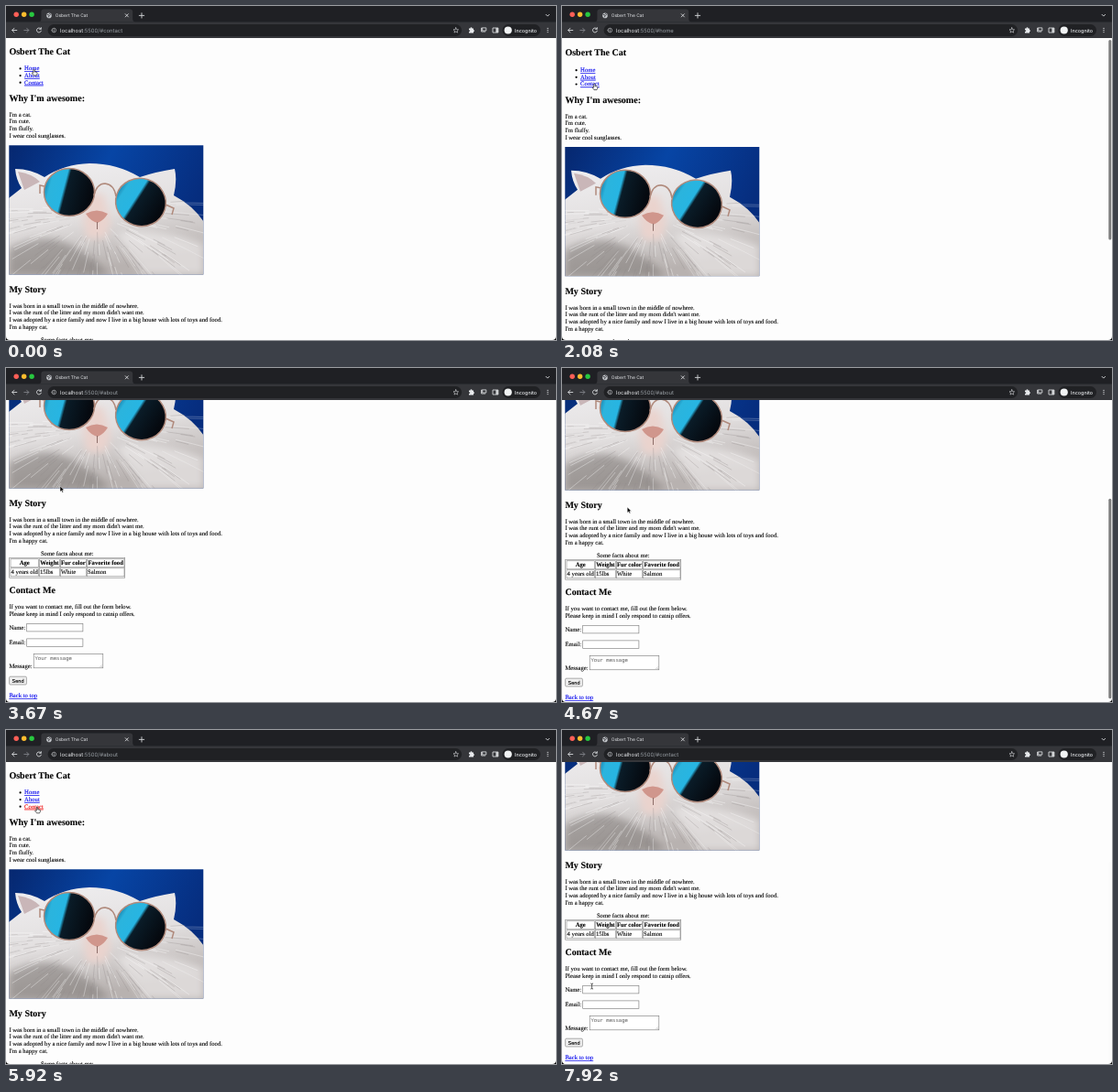
An HTML page for the animation above (8 s loop, 600 px wide and 365 px high).

```html
<!DOCTYPE html>
<html lang="en">
<head>
<meta charset="utf-8">
<title>Page anchors</title>
<style>
html, body { margin: 0; width: 100%; height: 100%; overflow: hidden; background: #000; }
svg { display: block; width: 100vw; height: 100vh; }
text { white-space: pre; text-rendering: geometricPrecision; }
.serif { font: 6.68px "Liberation Serif", Times, serif; color: #000; }
.serif text { fill: currentColor; stroke: currentColor; stroke-width: .1; }
.serif .head { font-size: 10.05px; font-weight: bold; }
.serif .bold { font-weight: bold; }
.serif .link { color: #00e; text-decoration: underline; }
.serif .hint { font: 5.64px "Liberation Mono", monospace; color: #757575; }
.serif .button { font: 5.64px "Liberation Sans", sans-serif; }
.mid { text-anchor: middle; }
.ui { font-family: Inter, Roboto, sans-serif; fill: #e8eaed; }
.icon { fill: none; stroke: #d5d7da; stroke-width: .9; stroke-linecap: round; stroke-linejoin: round; }
</style>
</head>
<body>
<svg id="stage" viewBox="0 0 600 365">
  <defs>
    <linearGradient id="sky" x2="1" y2=".3">
      <stop stop-color="#06276f"/><stop offset=".5" stop-color="#0745a5"/><stop offset="1" stop-color="#062d7e"/>
    </linearGradient>
    <linearGradient id="fur" x2=".3" y2="1">
      <stop stop-color="#f0eff1"/><stop offset=".55" stop-color="#e2dfdf"/><stop offset="1" stop-color="#b8b2b0"/>
    </linearGradient>
    <linearGradient id="lens" x2="1" y2=".25">
      <stop stop-color="#0c5f8c"/><stop offset=".2" stop-color="#2bb4dd"/><stop offset=".46" stop-color="#27b5e2"/>
      <stop offset=".52" stop-color="#0a1c28"/><stop offset="1" stop-color="#05090f"/>
    </linearGradient>
    <filter id="soft" x="-50%" y="-50%" width="200%" height="200%"><feGaussianBlur stdDeviation="4"/></filter>
    <clipPath id="window"><path d="M0 0H600V361q0 4-4 4H4q-4 0-4-4z"/></clipPath>
    <clipPath id="photo"><rect x="3.3" y="152.2" width="212" height="141.3"/></clipPath>
  </defs>
  <g clip-path="url(#window)">
    <rect width="600" height="365" fill="#fdfdfd"/>
    <g id="page" class="serif"></g>
    <rect id="bar" x="596.3" width="3" height="218.5" rx="1.5" fill="#7d7d7d"/>
    <g id="chrome"></g>
  </g>
  <g id="pointer" stroke-linejoin="round">
    <path id="arrow" d="M0 0V6.2L1.5 4.9 2.5 7.1 3.5 6.7 2.6 4.5H4.5Z" fill="#000" stroke="#fff" stroke-width=".5"/>
    <path id="hand" d="M-.7 .1Q0-.6 .7 .1V2.5Q3.4 2.2 3.5 3.6 3.5 5 2.6 6.4H-.5Q-1.4 5-2.4 3.8-2.3 2.9-.7 3.8Z" fill="#fff" stroke="#000" stroke-width=".6"/>
    <path id="beam" d="M-1.4-3Q0-3 0-2.2 0-3 1.4-3M0-2.2V2.2M-1.4 3Q0 3 0 2.2 0 3 1.4 3" fill="none" stroke="#222" stroke-width=".7"/>
  </g>
</svg>
<script>
const LOOP = 8000, LINE = 7.65, LEFT = 3.4, TOP = 35, MAX = 162;
const $ = id => document.getElementById(id);
const text = (x, y, str, cls = '', more = '') => `<text x="${x}" y="${y}" class="${cls}" ${more}>${str}</text>`;
const rect = (x, y, w, h, more) => `<rect x="${x}" y="${y}" width="${w}" height="${h}" ${more}/>`;
const path = (d, more) => `<path d="${d}" ${more}/>`;
const dot = (x, y, r, fill) => `<circle cx="${x}" cy="${y}" r="${r}" fill="${fill}"/>`;
const icon = (d, more = '') => path(d, 'class="icon" ' + more);
const box = (x, y, w, h, color = '#767676') => rect(x, y, w, h, `fill="#fff" stroke="${color}" stroke-width=".6"`);
const section = (y, title, rows) => text(LEFT, y, title, 'head') +
  rows.map((s, i) => text(LEFT, y + 17 + i * LINE, s)).join('');
const field = (y, label) => text(LEFT, y, label) + box(22.7, y - 6.5, 61.2, 8.6);

let seed = 7;
const random = () => (seed = seed * 16807 % 2147483647) / 2147483647;

// Hairs fan out from the nose
function hairs(count, color, width, reach) {
  let d = '';
  for (let i = 0; i < count; i++) {
    const a = (random() * 1.25 - .12) * Math.PI, near = 22 + random() * 70, far = near + reach * (.5 + random());
    const at = r => `${(99 + r * Math.cos(a)).toFixed(1)} ${(230 + r * .75 * Math.sin(a) + r * r / 900).toFixed(1)}`;
    d += `M${at(near)}Q${at((near + far) / 2 + 3)} ${at(far)}`;
  }
  return path(d, `fill="none" stroke="${color}" stroke-width="${width}" opacity=".5"`);
}

function photo() {
  const lens = (x, y, turn) => `<ellipse cx="${x}" cy="${y}" rx="27.5" ry="26"
    transform="rotate(${turn} ${x} ${y})" fill="url(#lens)" stroke="#b08a7c" stroke-width="1.5"/>`;
  return `<g clip-path="url(#photo)">` + rect(3, 152, 213, 142, 'fill="url(#sky)"') +
    path('M3 210L17 199Q11 190 10 178 27 178 42 187 63 173 91 172 121 172 146 187 164 181 184 178 187 190 183 207 204 218 216 236V294H3Z', 'fill="url(#fur)"') +
    path('M13 181Q28 183 37 192L20 201Z', 'fill="#c9b6b8"') +
    `<g filter="url(#soft)">` +
    path('M3 266Q40 244 74 263 98 275 112 294H3Z', 'fill="#77706f" opacity=".5"') +
    path('M120 248Q165 242 216 260V294H150Z', 'fill="#f4f2f2" opacity=".6"') +
    path('M92 205H106L114 236 108 254H88L84 232Z', 'fill="#ead3cd"') + '</g>' +
    hairs(70, '#8d8785', .6, 22) + hairs(70, '#fff', .7, 26) + hairs(12, '#fff', .5, 90) +
    path('M87 227Q99 220 111 227 107 234 100 237 92 235 87 227Z', 'fill="#d0968c"') +
    path('M99.5 236V244', 'stroke="#8d6d68"') +
    lens(69, 203.5, 0) + lens(147, 214.5, 18) +
    path('M96 207Q99 194 108 194 118 195 120 208M42 197L37 196V205M174 217L183 221 181 228', 'fill="none" stroke="#b08a7c" stroke-width="1.5"') +
    '</g>';
}

function table() {
  let x = 5;
  const column = ([head, value, w]) => {
    const cell = box(x, 370.8, w, 9, '#808080') + box(x, 380.8, w, 9, '#808080') +
      text(x + w / 2, 377.3, head, 'bold mid') + text(x + .6, 387.3, value);
    x += w + .9;
    return cell;
  };
  return text(66.7, 367.1, 'Some facts about me:', 'mid') + box(3.7, 369.5, 126, 21.7, '#808080') +
    [['Age', '4 years old', 30.5], ['Weight', '15lbs', 22], ['Fur color', 'White', 28.2],
      ['Favorite food', 'Salmon', 40.6]].map(column).join('');
}

$('page').innerHTML =
  text(LEFT, 52.5, 'Osbert The Cat', 'head') +
  ['Home', 'About', 'Contact'].map((s, i) => dot(15.6, 68.4 + i * LINE, 1.1, '#000') +
    text(20.1, 70.3 + i * LINE, s, 'link', `id="${s}"`)).join('') +
  section(103.8, "Why I'm awesome:", ["I'm a cat.", "I'm cute.", "I'm fluffy.", 'I wear cool sunglasses.']) +
  photo() +
  section(312.8, 'My Story', ['I was born in a small town in the middle of nowhere.',
    "I was the runt of the litter and my mom didn't want me.",
    'I was adopted by a nice family and now I live in a big house with lots of toys and food.',
    "I'm a happy cat."]) +
  table() +
  section(408.4, 'Contact Me', ['If you want to contact me, fill out the form below.',
    'Please keep in mind I only respond to catnip offers.']) +
  field(447.8, 'Name:') + field(464.4, 'Email:') +
  text(LEFT, 490.2, 'Message:') + box(30.2, 474.6, 75.6, 15.2) + text(31.4, 481, 'Your message', 'hint') +
  path('M102.3 489L105 486.3M104 489L105 488', 'stroke="#888" stroke-width=".4"') +
  rect(3.6, 499.2, 18.8, 8.8, 'rx="1.2" fill="#efefef" stroke="#767676" stroke-width=".6"') +
  text(13, 505.7, 'Send', 'button mid') +
  text(LEFT, 522.1, 'Back to top', 'link');

$('chrome').innerHTML =
  rect(0, 0, 600, 18, 'fill="#1f2024"') +
  rect(0, 17.5, 600, TOP - 17.5, 'fill="#35363a"') +
  path('M35 17.6Q38.4 17.6 38.4 14V6.5Q38.4 3.4 41.5 3.4H135Q138.2 3.4 138.2 6.5V14Q138.2 17.6 141.6 17.6Z', 'fill="#35363a"') +
  ['#ff5f57', '#febc2e', '#28c840'].map((c, i) => dot(11.2 + i * 8.45, 9.3, 2.7, c)).join('') +
  dot(47, 10.4, 2.8, '#c2c5c9') + icon('M45 9.4L47.4 10.2 46.4 12M47.5 8.4L49 9.6', 'style="stroke:#35363a"') +
  text(53.8, 12.2, 'Osbert The Cat', 'ui', 'font-size="4.9"') +
  icon('M130.2 8.7L133.4 11.9M133.4 8.7L130.2 11.9M145.3 10.4H150.7M148 7.7V13.1M589 9.3L590.8 11.1 592.6 9.3') +
  icon('M11.8 26.5H6.8M9 24.2L6.7 26.5 9 28.8') +
  icon('M19.8 26.5H24.8M22.6 24.2L24.9 26.5 22.6 28.8', 'style="stroke:#808388"') +
  icon('M38 24.9A2.5 2.5 0 1 0 38.4 27.2M38.3 23.6V25.3H36.6') +
  rect(45.6, 20.1, 451.5, 12.8, 'rx="6.4" fill="#202124"') +
  icon('M50 26.5a2.3 2.3 0 1 0 4.6 0a2.3 2.3 0 1 0-4.6 0M52.3 26.4V27.7M52.3 25.2V25.3', 'style="stroke-width:.6"') +
  `<text x="59" y="28.6" class="ui" font-size="5.9">localhost<tspan fill="#9aa0a6">:5500/#</tspan><tspan id="hash" fill="#9aa0a6"></tspan></text>` +
  icon('M490.8 23.7L491.6 25.6 493.6 25.8 492.1 27.1 492.6 29.1 490.8 28 489 29.1 489.5 27.1 488 25.8 490 25.6Z', 'style="stroke-width:.6"') +
  path('M505 24.6H506.6Q506.4 23.3 507.5 23.3 508.6 23.3 508.4 24.6H510V26.3Q511 26.2 511 27.1 511 28 510 27.9V29.4H505V27.9Q506.3 27.9 506.3 27 506.3 26.2 505 26.2Z', 'fill="#e8eaed"') +
  icon('M519.2 24H518.6V28H522.7M520 23.9H523.8V27H520Z') +
  icon('M531.4 24H536.9V29H531.4Z') + rect(534.4, 24, 2.5, 5, 'fill="#d5d7da"') +
  rect(541.5, 20.1, 41.5, 12.8, 'rx="6.4" fill="#202124"') +
  dot(547.7, 26.5, 4.1, '#f1f3f4') +
  text(555, 28.5, 'Incognito', 'ui', 'font-size="5.4" font-weight="500"') +
  [-1, 0, 1].map(i => dot(591, 26.5 + i * 2.1, .65, '#d5d7da')).join('');

const clamp = u => Math.min(Math.max(u, 0), 1);
const smooth = u => (u = clamp(u), u * u * (3 - 2 * u));

// Each click jumps to an anchor; the wheel later brings the page back to the top
const PRESS = 140, BOUNCE = 250;
const visits = [
  { link: 'Home', click: 420, to: 59, back: 1635, end: 1955 },
  { link: 'About', click: 2850, to: MAX, back: 4620, end: 5400 },
  { link: 'Contact', click: 6000, to: MAX, back: LOOP, end: LOOP + 1 },
];
// Pointer stops: leave and arrive times, place
const stops = [
  { x: 30.6, y: 69.5 },
  { from: 420, till: 1080, x: 41, y: 28.5 },
  { from: 1300, till: 1900, x: 35.4, y: 85.2 },
  { from: 2150, till: 2580, x: 31, y: 76.5 },
  { from: 3100, till: 4000, x: 71.2, y: 152 },
  { from: 4900, till: 5700, x: 34, y: 84.4 },
  { from: 6300, till: 7300, x: 32.6, y: 280 },
];

function scrollAt(t, v) {
  if (!v) return 0;
  const bounce = Math.sin(Math.PI * clamp((t - v.end) / BOUNCE));
  return v.to * (1 - smooth((t - v.back) / (v.end - v.back))) - 1.8 * bounce;
}

function pointerAt(t) {
  let { x, y } = stops[0];
  for (const s of stops.slice(1)) {
    const u = smooth((t - s.from) / (s.till - s.from));
    x += (s.x - x) * u;
    y += (s.y - y) * u;
  }
  return [x, y];
}

function shapeAt(x, y, scroll) {
  const over = (x0, x1, y0, y1) => y > TOP && x > x0 && x < x1 && y + scroll > y0 && y + scroll < y1;
  return over(20, 42, 64, 88) ? 'hand' : over(22, 84, 441, 450) ? 'beam' : 'arrow';
}

function draw(t) {
  const visit = visits.filter(v => v.click <= t).pop();
  const pressed = visits.find(v => t >= v.click - PRESS && t < v.click);
  const scroll = scrollAt(t, visit), [x, y] = pointerAt(t);

  $('page').setAttribute('transform', `translate(0 ${-scroll})`);
  $('hash').textContent = visit ? visit.link.toLowerCase() : 'contact';
  for (const { link } of visits) $(link).style.color = pressed && pressed.link === link ? '#e00' : '';

  $('bar').setAttribute('y', 37 + clamp(scroll / MAX) * 107);
  $('bar').setAttribute('opacity', visit ? clamp((t - visit.back + 80) / 100) * clamp((visit.end + 500 - t) / 150) : 0);

  const shape = shapeAt(x, y, scroll);
  for (const id of ['arrow', 'hand', 'beam']) $(id).style.display = id === shape ? '' : 'none';
  $('pointer').setAttribute('transform', `translate(${x} ${y})`);
  $('pointer').style.display = pressed && pressed.link === 'About' ? 'none' : '';
}

const start = performance.now();
function tick(now) {
  draw(Math.max(now - start, 0) % LOOP);
  requestAnimationFrame(tick);
}
draw(0);
requestAnimationFrame(tick);
</script>
</body>
</html>
```
